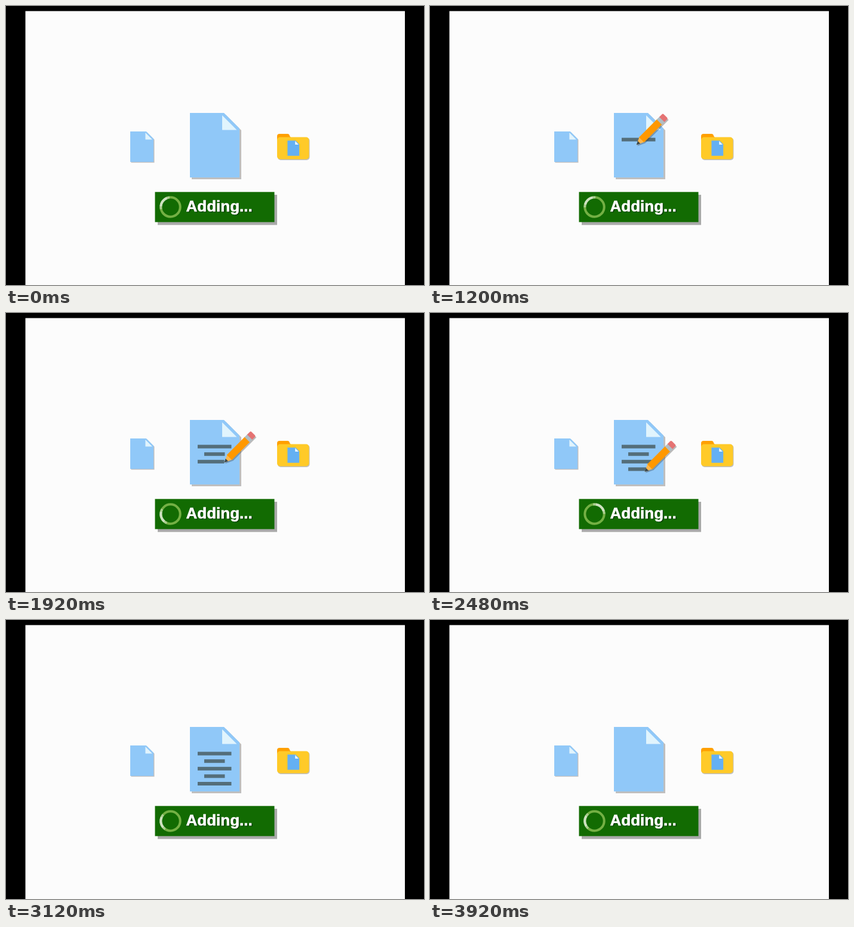
These frames come from a looping animation (700x467 px, 3960 ms). An HTML page with a canvas:

```html
<!DOCTYPE html>
<html lang="en">
<head>
<meta charset="utf-8">
<title>Adding</title>
<style>
  html, body { margin: 0; width: 100%; height: 100%; overflow: hidden; background: #000; }
  canvas { display: block; width: 700px; height: 467px; }
</style>
</head>
<body>
<canvas id="stage" width="700" height="467"></canvas>
<script>
const g = document.getElementById('stage').getContext('2d');
const LOOP = 3960, STEP = 40, SPIN = LOOP / 10;

// Writing: five rows, each one stroke followed by a quick hop
const ROWS = 5, WRITE = 783, ROW = 441, STROKE = 362;
const FLY = 280, LAND = 440, LIFT = 3000;

// Page poses: centre and scale
const BIG = { x: 349.6, y: 233, s: 1 };
const SMALL = { x: 227.6, y: 235.5, s: 0.47 };
const FILED = { x: 481, y: 238, s: 0.52 };

const clamp = v => Math.min(1, Math.max(0, v));
const part = (t, a, b) => clamp((t - a) / (b - a));
const smooth = p => p * p * (3 - 2 * p);
const mix = (a, b, p) => a + (b - a) * p;
const between = (a, b, p) => ({ x: mix(a.x, b.x, p), y: mix(a.y, b.y, p), s: mix(a.s, b.s, p) });

// Odd rows are short and centred
const rowWidth = i => i % 2 ? 34.5 : 56.5;
const rowLeft = i => 349.2 - rowWidth(i) / 2;
const written = (t, i) => smooth(part(t - WRITE - i * ROW, 0, STROKE));

function tip(t) {
  if (t < WRITE) {
    const p = part(t, FLY, LAND);
    return [mix(666, 322, p), mix(8, 223, p)];
  }
  const i = Math.min(ROWS - 1, Math.floor((t - WRITE) / ROW));
  const hop = i < ROWS - 1 ? part(t - WRITE - i * ROW, STROKE, ROW) : 0;
  const x = rowLeft(i) + rowWidth(i) * written(t, i);
  return [mix(x, rowLeft(i + 1), hop), 223 + 13.6 * (i + hop)];
}

function rect(x, y, w, h, fill) {
  g.fillStyle = fill;
  g.fillRect(x, y, w, h);
}

function poly(fill, ...pts) {
  g.fillStyle = fill;
  g.beginPath();
  for (let i = 0; i < pts.length; i += 2) g.lineTo(pts[i], pts[i + 1]);
  g.closePath();
  g.fill();
}

function round(x, y, w, h, r, fill) {
  g.fillStyle = fill;
  g.beginPath();
  g.roundRect(x, y, w, h, r);
  g.fill();
}

function sheet(fill, d = 0) {
  poly(fill, 308 + d, 179 + d, 365 + d, 179 + d, 391 + d, 205 + d, 391 + d, 287 + d, 308 + d, 287 + d);
}

function page({ x, y, s }, t = 0, body = '#90c8f8', fold = '#e1f4fd', shade = true) {
  g.save();
  g.translate(x, y);
  g.scale(s, s);
  g.translate(-BIG.x, -BIG.y);
  if (shade) sheet('#bfbfbf', 3);
  sheet(body);
  poly(fold, 362, 183, 386.5, 207.5, 362, 207.5);
  for (let i = 0; i < ROWS; i++) {
    rect(rowLeft(i), 220.6 + i * 12.6, rowWidth(i) * written(t, i), 6, '#546e7a');
  }
  g.restore();
}

function folder() {
  round(455, 220.5, 53.5, 37.5, 5, '#bfbfbf');
  round(454, 214, 21, 20, 4, '#ffa000');
  poly('#ffa000', 472, 214, 477, 220, 472, 220);
  round(454, 219.5, 53.5, 37, 5, '#ffca28');
  page({ x: 481.3, y: 238, s: 0.238 }, 0, '#64b0f3', '#f2f9ff', false);
}

function pencil(t) {
  if (t <= FLY || t >= LIFT) return;
  g.save();
  g.beginPath();
  g.rect(32, 8, 636, 459);
  g.clip();
  g.translate(...tip(t));
  g.save();
  g.translate(1.5, 2);
  g.rotate(-Math.PI / 4);
  poly('rgba(60,60,60,.35)', 0, 0, 13, -6, 68, -6, 68, 6, 13, 6);
  g.restore();
  g.rotate(-Math.PI / 4);
  poly('#ffb74d', 0, 0, 13, -6, 13, 6);
  poly('#37474f', 0, 0, 6, -3, 6, 3);
  rect(12, -6, 43, 12, '#ff9800');
  rect(54, -6, 7, 12, '#b0bec5');
  round(60, -6, 8.5, 12, [0, 2, 2, 0], '#e57373');
  g.restore();
}

function ring(mid, half, color) {
  g.strokeStyle = color;
  g.beginPath();
  g.arc(275.5, 336.5, 16.2, mid - half, mid + half);
  g.stroke();
}

function banner(t) {
  rect(254, 316, 200, 50.5, '#a9a9a9');
  rect(249.5, 311.3, 200, 50.4, '#126b02');
  g.lineWidth = 4;
  ring(0, Math.PI, '#74b044');
  const mid = (t / SPIN - 0.4) * Math.PI * 2;
  ring(mid, 0.85, 'rgba(225,236,220,.5)');
  ring(mid, 0.55, 'rgba(225,236,220,.65)');
  g.font = 'bold 26px "Liberation Sans", Arial, sans-serif';
  g.lineJoin = 'round';
  g.lineWidth = 0.6;
  for (const [color, d] of [['#0a3d00', 1.5], ['#fff', 0]]) {
    g.fillStyle = g.strokeStyle = color;
    g.fillText('Adding...', 301.5 + d, 343.7 + d);
    g.strokeText('Adding...', 301.5 + d, 343.7 + d);
  }
}

function draw(t) {
  rect(0, 0, 700, 467, '#000');
  rect(32.5, 8.5, 635.5, 459, '#fcfcfc');
  page(SMALL);
  folder();
  if (t < 3160) page(BIG, t);
  if (t >= 3340) page(between(SMALL, BIG, smooth(part(t, 3340, 3840))));
  if (t >= 3160 && t < 3520) {
    g.globalAlpha = 1 - part(t, 3440, 3520);
    page(between(BIG, FILED, smooth(part(t, 3160, 3480))), t);
    g.globalAlpha = 1;
  }
  pencil(t);
  banner(t);
}

const start = performance.now();
function tick() {
  const t = (performance.now() - start) % LOOP;
  draw(Math.floor(t / STEP) * STEP);
  requestAnimationFrame(tick);
}
tick();
</script>
</body>
</html>
```
